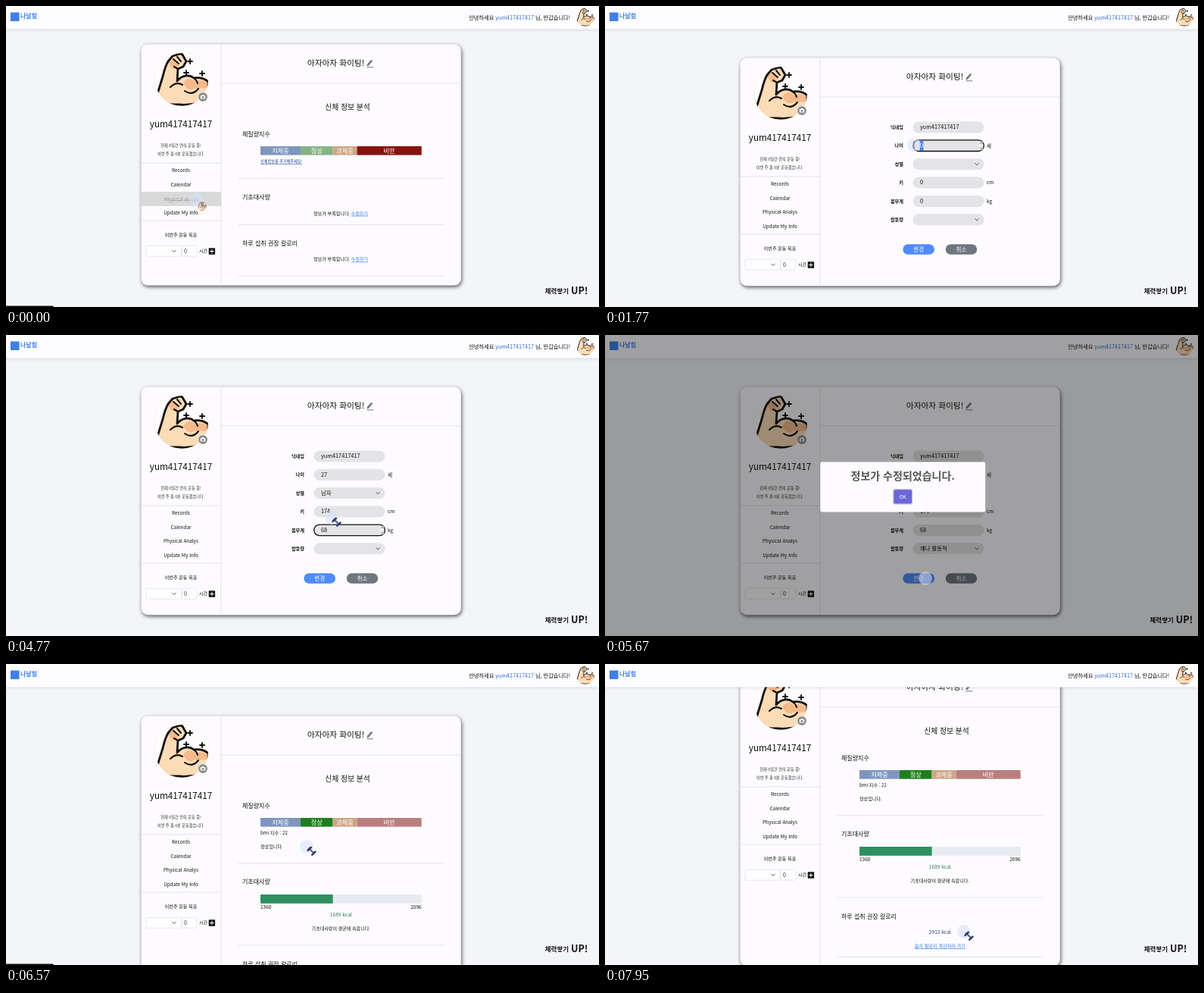
An HTML page for the animation above (7980 ms loop, 783x397 px).

```html
<!DOCTYPE html>
<html lang="ko">
<head>
<meta charset="utf-8">
<title>신체 정보</title>
<style>
  html, body { margin: 0; width: 100%; height: 100%; overflow: hidden; background: #f3f5f8; }
  svg { display: block; width: 783px; height: 397px; }
  text { font-family: "Noto Sans CJK KR", "Noto Sans CJK JP", "Noto Sans", sans-serif; white-space: pre; }
  .card { filter: drop-shadow(1px 2px 2.5px rgba(0, 0, 0, .65)); }
  .top { filter: drop-shadow(0 1px 2px rgba(0, 0, 0, .12)); }
  .over { fill: #fff; text-shadow: .5px .5px 1.5px #444; }
</style>
</head>
<body>
<svg id="stage" viewBox="0 0 783 397"></svg>
<script>
const LOOP = 7980;
const USER = 'yum417417417';
const MENU = ['Records', 'Calendar', 'Physical Analys', 'Update My Info'];
const LINK = '#2b7de9';
const ROW_TOP = 225.4, ROW_H = 18.8;
const OPEN_FORM = 510, SHOW_RESULT = 6300, DIALOG_IN = 5610, DIALOG_OUT = 6150;

// ---- drawing helpers (y is the middle of the line) ----
const label = (x, y, str, size, o = {}) =>
  `<text x="${x}" y="${y + size * .36}" font-size="${size}" text-anchor="${o.at || 'start'}"
    font-weight="${o.w || 400}" fill="${o.c || '#111'}" ${o.u ? 'text-decoration="underline"' : ''}
    ${o.id ? `id="${o.id}"` : ''}>${str}</text>`;
const mid = (x, y, str, size, o) => label(x, y, str, size, { at: 'middle', ...o });
const box = (x, y, w, h, fill, r = 0, extra = '') =>
  `<rect x="${x}" y="${y}" width="${w}" height="${h}" rx="${r}" fill="${fill}" ${extra}/>`;
const path = (d, stroke, width, fill = 'none') =>
  `<path d="${d}" stroke="${stroke}" stroke-width="${width}" fill="${fill}" stroke-linecap="round" stroke-linejoin="round"/>`;
const rule = (x1, x2, y) => path(`M${x1} ${y}H${x2}`, '#dcdce2', .8);
const chevron = (x, y) => path(`M${x - 2.3} ${y - 1.2}l2.3 2.4l2.3 -2.4`, '#444', .9);
const group = (id, body, extra = '') => `<g id="${id}" ${extra}>${body}</g>`;

// ---- flexed arm, 70 by 70 units ----
const plus = (x, y) => path(`M${x - 3} ${y}h6M${x} ${y - 3}v6`, '#111', 1.9);
const armPath = 'M23 4L33 1Q36 1 37 4L41 11L37 18L30 21L29 37C35 29 45 28 51 33C57 32 65 33 70 38' +
  'L70 58C58 68 42 69 31 68Q14 68 4 64Q1 62 2 57L10 31Q13 18 17 11Z';
const arm = `
  <g clip-path="url(#round)">
    <circle cx="35" cy="35" r="35" fill="#fffdfd"/>
    ${path(armPath, 'none', 0, '#fbdcb6')}
    ${path('M37 40C42 32 48 33 53 38C58 35 66 36 70 41V48C62 44 58 49 52 46C48 51 41 48 37 40Z', 'none', 0, '#f5b98b')}
    ${path('M17 12L25 8L31 15L28 21L22 20Z', 'none', 0, '#f5b98b')}
    ${path(armPath, '#15110f', 2.8)}
    ${path('M20 45Q28 37 36 42M51 33Q55 36 56 40M24 8L31 14M29 5L34 11M30 21L25 18M39 50Q49 57 57 47', '#15110f', 2.1)}
  </g>
  ${plus(46, 11)}${plus(41, 26)}${plus(62, 27)}`;

// ---- sidebar and page ----
const sidebar = `
  <circle cx="232" cy="115" r="35" fill="none" stroke="#e2e0e6" stroke-width=".8" stroke-dasharray="1 1"/>
  <g transform="translate(197 80)">${arm}</g>
  <circle cx="260" cy="138" r="6.2" fill="#8b8b8e" stroke="#fff" stroke-width=".6"/>
  ${box(256.8, 136, 6.4, 4.6, '#fff', .8)}${box(258.6, 135, 2.8, 1.6, '#fff', .4)}
  <circle cx="260" cy="138.3" r="1.5" fill="#8b8b8e"/>
  ${mid(231, 174, USER, 11.7)}
  ${mid(231, 202.5, '현재 0일간 연속 운동 중!', 5.2, { c: '#333' })}
  ${mid(231, 213, '이번 주 총 0분 운동했습니다.', 5.15, { c: '#333' })}
  ${rule(179, 284, 225)}
  ${box(179, 0, 105, ROW_H, '#d9d9da', 0, 'id="rowBg"')}
  ${MENU.map((m, i) => mid(231, ROW_TOP + ROW_H * (i + .48), m, 6.4, { id: 'row' + i })).join('')}
  ${rule(179, 284, 301)}
  ${mid(231, 320, '이번주 운동 목표', 6.1, { w: 500 })}
  ${box(185, 334.2, 46.5, 14, '#fefdff', 2, 'stroke="#dfe0e6" stroke-width=".7"')}${chevron(222, 341.3)}
  ${box(232.3, 334.2, 19.5, 14, '#fefdff', 2, 'stroke="#dfe0e6" stroke-width=".7"')}
  ${label(235, 341, '0', 7, { c: '#333' })}${label(255, 341.2, '시간', 6, { w: 500 })}
  ${box(267.7, 337.3, 8.4, 8.4, '#111', .6)}${path('M269.6 341.5h4.6M271.9 339.2v4.6', '#fff', 1)}`;

const heading = `
  ${mid(435.5, 93, '아자아자 화이팅!', 10.7, { w: 500 })}
  ${path('M478 95.6L482.6 90.4', '#77777a', 2.6)}${path('M477 97L477.6 95', '#77777a', 1)}
  ${path('M477 98.8H485', '#77777a', 1)}
  ${rule(284, 601, 120)}`;

// ---- body analysis ----
const bmiParts = [
  [336, 53, '저체중', '#7f95be'], [389, 42.5, '정상', '#86b285'],
  [431.5, 32, '과체중', '#cda688'], [463.5, 85.2, '비만', '#b97f80']
];
const bmiBar = (active, vivid) => bmiParts.map(([x, w, name, c], i) =>
  box(x, 203, w, 11.6, i === active ? vivid : c) +
  mid(x + w / 2, 208.6, name, 8.2, { c: '#fff', w: 500 })).join('');
const title = (y, str) => label(312, y, str, 8, { w: 500 });
const analysis = `${mid(451, 151, '신체 정보 분석', 9.8, { w: 500 })}${title(187, '체질량지수')}`;
const lacking = y => label(406, y, '정보가 부족합니다.', 6.1, { w: 500 }) +
  label(455.6, y, '수정하기', 6.1, { c: LINK, u: 1 });
const split = y => rule(307, 578, y);

const emptyPage = `${analysis}${bmiBar(3, '#87120f')}
  ${label(336, 223.5, '신체정보를 추가해주세요!', 5.15, { c: '#1d3f92', u: 1, w: 500 })}
  ${split(245.3)}${title(270.5, '기초대사량')}${lacking(291.5)}
  ${split(306.5)}${title(331, '하루 섭취 권장 칼로리')}${lacking(352.3)}${split(374)}`;

const resultPage = `${analysis}${bmiBar(1, '#1f7f1e')}
  ${label(336, 223, 'bmi 지수 : 22', 6.1)}${label(336, 240.7, '정상입니다.', 6.1)}
  ${split(262.8)}${title(287.5, '기초대사량')}
  ${box(336, 304, 212.7, 11.8, '#e8ebef')}${box(336, 304, 95.6, 11.8, '#2d9061')}
  ${label(336, 320.6, '1360', 6.5)}${label(548.7, 320.6, '2096', 6.5, { at: 'end' })}
  ${mid(442.3, 330.4, '1689 kcal', 6.6, { c: '#2b7f58' })}
  ${mid(442.3, 348.4, '기초대사량이 평균에 속합니다.', 6.05)}
  ${split(371)}${title(396, '하루 섭취 권장 칼로리')}
  ${mid(442.3, 417, '2913 kcal', 6.6, { c: '#2c3f78' })}
  ${mid(442.3, 435, '음식 칼로리 계산하러 가기', 6.15, { c: LINK, u: 1 })}${split(449.4)}`;

// ---- form: name, middle, unit, is it a list ----
const fields = [
  ['닉네임', 160, ''], ['나이', 184.2, '세'], ['성별', 208.6, '', 1],
  ['키', 233, 'cm'], ['몸무게', 257.4, 'kg'], ['활동량', 281.8, '', 1]
];
const button = (x, w, name, c) => box(x, 314.2, w, 13.6, c, 6.8) +
  mid(x + w / 2, 321, name, 7.5, { c: '#fff', w: 500 });
const formPage = fields.map(([name, y, unit, list], i) => `
  ${label(394, y, name, 6.2, { at: 'end', w: 700 })}
  ${box(406.5, y - 7.5, 94, 15, '#e4e3e5', 7.5)}
  ${i === 1 ? box(415.7, y - 6, 4.6, 12.4, '#3d7df0', 0, 'id="picked"') : ''}
  ${label(416, y - .2, '', 7.3, { id: 'value' + i })}
  ${list ? chevron(491, y) : ''}${label(504, y, unit, 6.5, { w: 500 })}`).join('') +
  group('focus', box(406.7, -7.3, 93.6, 14.6, 'none', 7.3, 'stroke="#111" stroke-width="1.3"') +
    box(494, -5.4, 5, 10.8, '#f1f0f2', 1.5) +
    path('M495.4 -2.8l1.3 -1.4l1.3 1.4M495.4 2.8l1.3 1.4l1.3 -1.4', '#333', .8)) +
  group('hint', box(437, 244.2, 19, 13, '#fafafc', 1, 'stroke="#d8d8dc" stroke-width=".6"') +
    label(442, 250.6, '174', 3.8, { c: '#777' })) +
  button(393.3, 41.7, '변경', '#4f8bfa') + button(449.7, 41.5, '취소', '#6e777f');

// ---- pointer shapes ----
const bell = path('M3 2L10 9', '#2e3a66', 1.6) + path('M1.6 4.8L5.8 .8M7.2 10.6L11.4 6.6', '#2e3a66', 2.6) +
  path('M4 5L8 9', '#aebbe4', .7);
const beam = path('M-1 -3.5h2M0 -3.5v7M-1 3.5h2', '#555', .6);

const $ = id => document.getElementById(id);
$('stage').innerHTML = `
  <defs><clipPath id="round"><circle cx="35" cy="35" r="35"/></clipPath></defs>
  ${box(0, 0, 783, 397, '#f3f5f8')}
  ${group('page', box(178.6, 68.6, 422.2, 300, '#fdfbfe', 9, 'id="card" class="card"') +
    path('M284 69V369', '#dcdce2', .8).replace('<path', '<path id="wall"') + sidebar + heading +
    group('empty', emptyPage) + group('form', formPage) + group('result', resultPage))}
  ${box(0, 0, 783, 30.5, '#fdfcfe', 0, 'class="top"')}
  ${box(6, 8.5, 11.5, 11.5, '#3f7fe8')}
  ${label(19, 13.5, '나날힘', 8, { c: '#3f7fe8', w: 700 })}
  ${label(745, 15, `안녕하세요 <tspan fill="#2f6fd8" font-weight="500">${USER}</tspan> 님, 반갑습니다!`, 7.2, { at: 'end' })}
  <g transform="translate(752.8 2.8) scale(.343)">${arm}</g>
  ${group('slogan', label(743, 375.5, '체력쌓기', 8.5, { at: 'end', w: 900 }) +
    label(768.5, 375, 'UP!', 12.6, { at: 'end', w: 900 }))}
  ${path('M0 397V395.4H61.5Q63 395.4 63 397Z', 'none', 0, '#111').replace('<path', '<path id="status"')}
  ${box(0, 0, 783, 397, '#000', 0, 'id="dim"')}
  ${group('dialog', box(-111, -33.5, 222, 67, '#fdfbfe', 2.2) +
    mid(0, -14.5, '정보가 수정되었습니다.', 14.3, { c: '#545454', w: 600 }) +
    box(-13.2, 2.5, 26.4, 21, '#b9b6ee', 3) + box(-12, 3.8, 24, 18.4, '#6c67d9', 2) +
    mid(0, 13, 'OK', 6.7, { c: '#fff' }))}
  ${group('pointer', '<circle r="9" fill="#d5e2ff" fill-opacity=".55"/>' +
    group('bell', bell) + group('beam', beam) +
    group('hand', arm.replace('<circle cx="35" cy="35" r="35" fill="#fffdfd"/>', ''),
      'transform="translate(2 3) scale(.17)"'))}`;

// ---- timing ----
const moves = [
  [0, 251, 255], [300, 250, 271], [750, 250, 271], [1420, 424, 184], [1560, 424, 184],
  [1770, 408, 183], [2160, 408, 183], [2520, 430, 209], [2760, 430, 212], [3030, 416, 231],
  [3270, 408, 220], [3600, 408, 220], [4020, 424, 256], [4380, 430, 241], [4770, 430, 241],
  [5040, 446, 282], [5190, 440, 284], [5460, 423, 321], [5700, 423, 321], [6030, 393, 214],
  [6180, 393, 214], [6510, 397, 241], [6720, 397, 241], [7230, 474, 353]
];
const shapes = [[0, 'hand'], [800, 'bell'], [1380, 'beam'], [2200, 'bell'], [5400, 'hand'],
  [5600, ''], [5720, 'bell'], [5980, 'hand'], [6220, 'bell']];
const values = [
  [[0, USER]],
  [[0, '0'], [1950, '2'], [2070, '27']],
  [[0, ''], [2730, '남자']],
  [[0, '0'], [3180, '1'], [3270, '17'], [3480, '174']],
  [[0, '0'], [4440, '6'], [4530, '68']],
  [[0, ''], [5190, '꽤나 활동적']]
];
const focused = [[0, -1], [1500, 1], [2550, -1], [3060, 3], [4050, 4], [5010, -1]];
const popScale = [[0, .7], [65, 1], [90, 1.05], [160, .95], [220, 1]];

const at = (steps, t) => steps.reduce((v, s) => s[0] <= t ? s[1] : v, steps[0][1]);
const clamp = v => Math.min(1, Math.max(0, v));
const ease = v => v * v * (3 - 2 * v);
const part = (t, from, to) => clamp((t - from) / (to - from));
const tween = (steps, t, k, curve) => {
  const i = steps.findIndex(s => s[0] > t);
  if (i < 0) return steps[steps.length - 1][k];
  const a = steps[i - 1], b = steps[i];
  return a[k] + (b[k] - a[k]) * curve(part(t, a[0], b[0]));
};
const show = (id, on) => $(id).setAttribute('visibility', on ? 'inherit' : 'hidden');
const shift = (id, x, y, s = 1) => $(id).setAttribute('transform', `translate(${x} ${y}) scale(${s})`);

function render(t) {
  const view = t < OPEN_FORM ? 'empty' : t < SHOW_RESULT ? 'form' : 'result';
  for (const v of ['empty', 'form', 'result']) show(v, v === view);
  const height = { empty: 318, form: 300.6, result: 393 }[view];
  const scroll = view === 'empty' ? 18 : 63 * ease(part(t, 6690, 7170));
  $('card').setAttribute('height', height);
  $('wall').setAttribute('d', `M284 69V${68.6 + height}`);
  shift('page', 0, -scroll);
  show('status', view === 'empty' || (view === 'result' && t < 6750));

  const x = tween(moves, t, 1, ease), y = tween(moves, t, 2, ease);
  shift('pointer', x, y);
  for (const s of ['bell', 'beam', 'hand']) show(s, s === at(shapes, t));

  const row = x > 179 && x < 284 ? Math.floor((y + scroll - ROW_TOP) / ROW_H) : -1;
  show('rowBg', row >= 0 && row < 4);
  $('rowBg').setAttribute('y', ROW_TOP + ROW_H * row);
  MENU.forEach((_, i) => $('row' + i).setAttribute('class', i === row ? 'over' : ''));

  values.forEach((steps, i) => { $('value' + i).textContent = at(steps, t); });
  const active = at(focused, t), picked = t >= 1680 && t < 1950;
  show('focus', view === 'form' && active >= 0);
  if (active >= 0) shift('focus', 0, fields[active][1]);
  show('picked', view === 'form' && picked);
  $('value1').setAttribute('fill', picked ? '#fff' : '#111');
  show('hint', view === 'form' && t >= 3180 && t < 3480);

  const open = t >= DIALOG_IN && t < DIALOG_OUT + 90;
  const leave = part(t, DIALOG_OUT, DIALOG_OUT + 90);
  const enter = part(t, DIALOG_IN - 20, DIALOG_IN + 60);
  show('dim', open);
  show('dialog', open);
  $('dim').setAttribute('opacity', .37 * enter * (1 - leave));
  $('dialog').setAttribute('opacity', enter * (1 - leave));
  const scale = open ? tween(popScale, t - DIALOG_IN, 1, v => v) - .5 * leave : 1;
  shift('dialog', 393.2, 200.5, scale);
  shift('slogan', open ? 7.8 : 0, 0);
}

const start = performance.now();
function tick() {
  render((performance.now() - start) % LOOP);
  requestAnimationFrame(tick);
}
tick();
</script>
</body>
</html>
```
